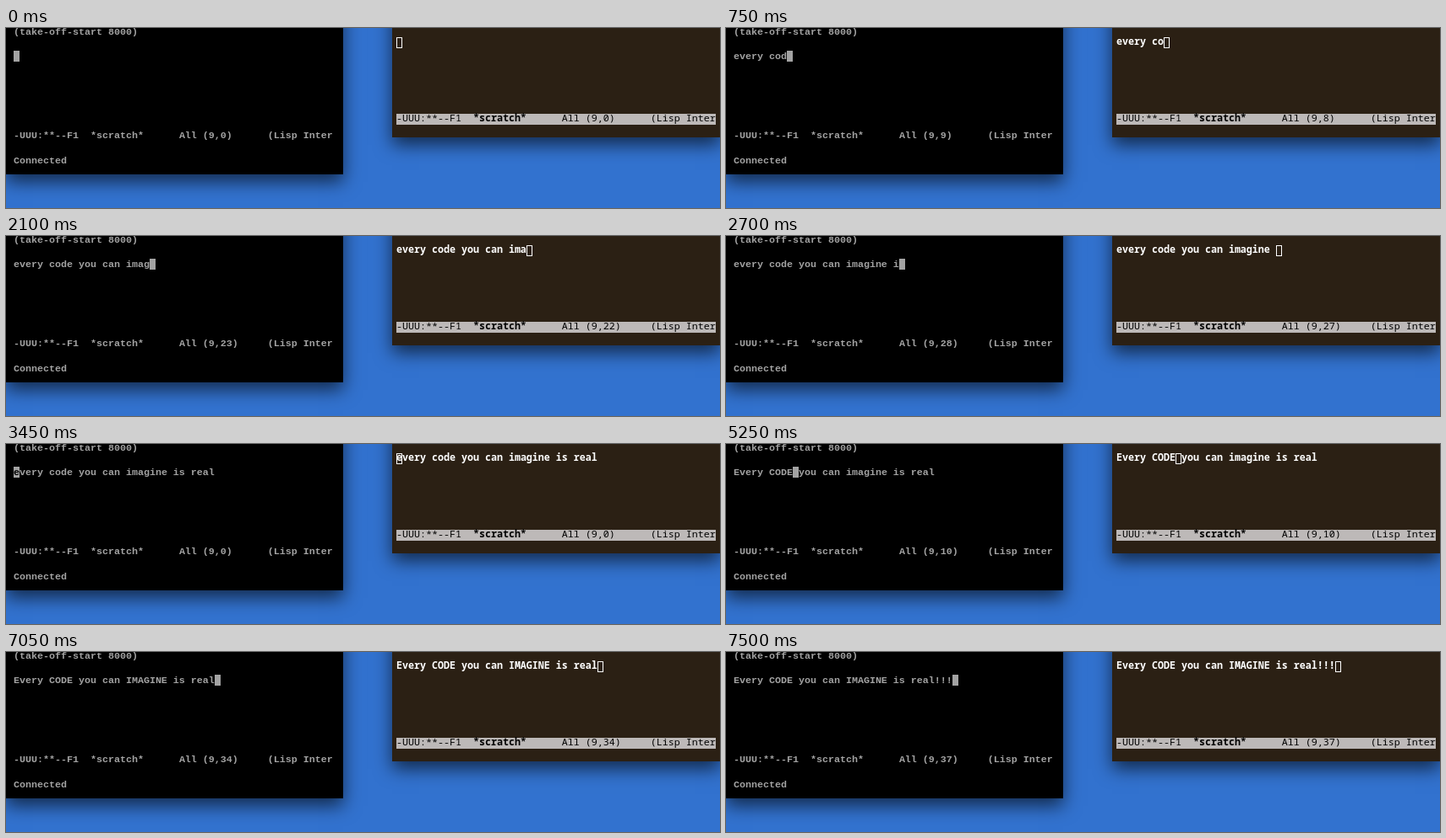
These frames come from a looping animation (845x214 px, 8.7 s). An HTML page:

```html
<!DOCTYPE html>
<html lang="en">
<head>
<meta charset="utf-8">
<title>Shared scratch buffer</title>
<style>
html, body { margin: 0; width: 100%; height: 100%; overflow: hidden; }
body { position: relative; background: #3272cf; }
.win { position: absolute; box-shadow: 0 9px 20px rgba(0, 0, 0, .62); }
#back { left: 0; top: -200px; width: 399px; height: 374px; background: #000; }
#front { left: 457px; top: -200px; width: 388px; height: 330px; background: #2b2014; }
svg { position: absolute; left: 0; top: 0; display: block; }
text { white-space: pre; font-size: 11.667px; }
.l text { font-family: "Liberation Mono", "Courier New", monospace; font-weight: 700; fill: #a3a3a3; }
.r text { font-family: "Noto Sans Mono", "DejaVu Sans Mono", monospace; font-weight: 700; fill: #fff; }
.r .mode { font-weight: 500; fill: #000; }
.r .mode .name { font-weight: 700; }
.l .under { fill: #000; }
.l .cursor { fill: #a3a3a3; }
.r .cursor { fill: none; stroke: #fff; }
</style>
</head>
<body>
<div class="win" id="back"></div>
<div class="win" id="front"></div>
<svg width="845" height="214" viewBox="0 0 845 214">
  <g class="l">
    <text x="9" y="8">(take-off-start 8000)</text>
    <rect class="cursor" y="27" width="7" height="13"/>
    <text x="9" y="37"><tspan class="before"></tspan><tspan class="under"></tspan><tspan class="after"></tspan></text>
    <text class="mode" x="9" y="131">-UUU:**--F1  <tspan class="name">*scratch*</tspan><tspan class="pos"></tspan></text>
    <text x="9" y="161">Connected</text>
  </g>
  <g class="r">
    <rect x="462" y="102" width="378" height="13" fill="#bdb9b8"/>
    <text x="462" y="20"><tspan class="before"></tspan><tspan class="under"></tspan><tspan class="after"></tspan></text>
    <rect class="cursor" y="11.5" width="6" height="12"/>
    <text class="mode" x="462" y="111">-UUU:**--F1  <tspan class="name">*scratch*</tspan><tspan class="pos"></tspan></text>
  </g>
</svg>
<script>
const LOOP = 8700, TICK = 150, CELL = 7;
const LINE = "every code you can imagine is real";

// typing progress: [tick, characters typed]
const KEYS_L = [[0, 0], [5, 9], [10, 17], [18, 28], [22, 34]];
const KEYS_R = [[0, 0], [5, 8], [10, 17], [18, 27], [22, 34]];

// edits after typing: [time, text, cursor column]
const EDITS = [
  [3450, LINE, 0],
  [4350, "Every code you can imagine is real", 5],
  [5250, "Every CODE you can imagine is real", 10],
  [5550, "Every CODE you can imagine is real", 14],
  [6000, "Every CODE you can imagine is real", 18],
  [6300, "Every CODE you can IMAGINE is real", 26],
  [7050, "Every CODE you can IMAGINE is real", 34],
  [7350, "Every CODE you can IMAGINE is real!!", 36],
  [7500, "Every CODE you can IMAGINE is real!!!", 37]
];

function typed(keys, tick) {
  const i = Math.max(1, keys.findIndex(k => k[0] >= tick));
  const [t0, n0] = keys[i - 1], [t1, n1] = keys[i];
  return Math.round(n0 + (n1 - n0) * (tick - t0) / (t1 - t0));
}

function stateAt(keys, time) {
  if (time < EDITS[0][0]) {
    const n = typed(keys, Math.floor(time / TICK));
    return [LINE.slice(0, n), n];
  }
  return EDITS.filter(e => e[0] <= time).pop().slice(1);
}

function makePane(sel, keys, x) {
  const get = c => document.querySelector(sel + " " + c);
  const before = get(".before"), under = get(".under"), after = get(".after");
  const cursor = get(".cursor"), pos = get(".pos");
  let last = "";
  return time => {
    const [text, col] = stateAt(keys, time);
    const key = text + col;
    if (key === last) return;
    last = key;
    before.textContent = text.slice(0, col);
    under.textContent = text.slice(col, col + 1);
    after.textContent = text.slice(col + 1);
    cursor.setAttribute("x", x + col * CELL);
    pos.textContent = "      " + `All (9,${col})`.padEnd(15) + "(Lisp Inter";
  };
}

const panes = [makePane(".l", KEYS_L, 9), makePane(".r", KEYS_R, 462.5)];
const start = performance.now();

function draw() {
  const time = (performance.now() - start) % LOOP;
  panes.forEach(p => p(time));
  requestAnimationFrame(draw);
}
draw();
</script>
</body>
</html>
```
